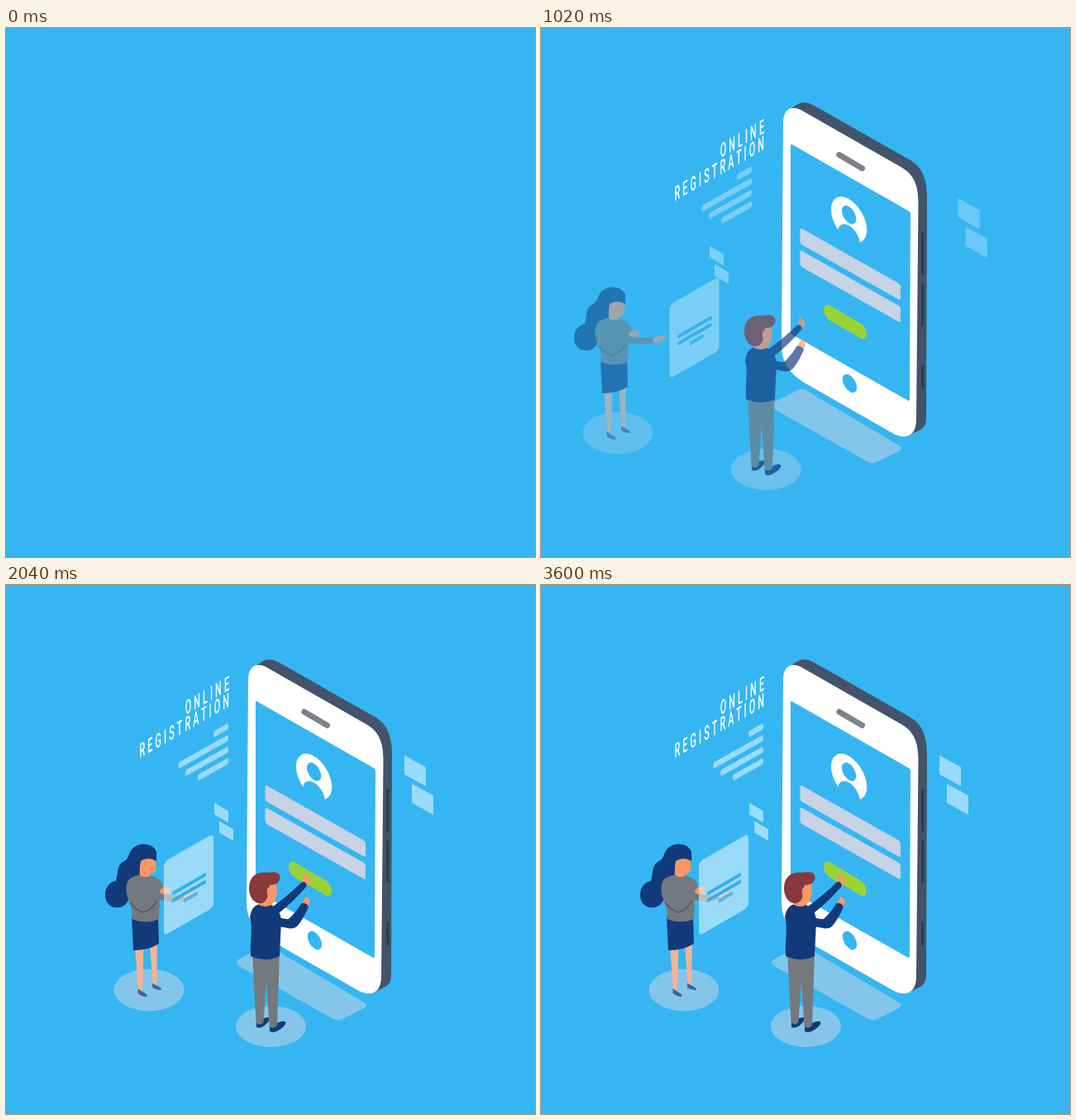
Write an HTML page that moves like this. It is 640 px wide and 640 px high and loops after 3.63 s.

```html
<!DOCTYPE html>
<html lang="en">
<head>
<meta charset="utf-8">
<title>Online registration</title>
<style>
  html, body { margin: 0; width: 100%; height: 100%; overflow: hidden; background: #35b6f2; }
  svg { display: block; width: 100vw; height: 100vh; }

  /* Every part slides in from --d with a quadratic ease-out while it fades in linearly. */
  .part {
    animation: var(--move) 3630ms cubic-bezier(.333, .667, .667, 1) infinite,
               var(--fade) 3630ms linear infinite;
  }
  .phone  { --move: drop;  --fade: fade-first; --d: 0 -150px; }
  .shadow { --move: drop;  --fade: fade-first; --d: 0 225px; }
  .lines  { --move: glide; --fade: fade-mid;   --d: -448px 0; }
  .man    { --move: walk;  --fade: fade-mid;   --d: -460px 0; }
  .panel  { --move: carry; --fade: fade-mid;   --d: -433px 0; }
  .woman  { --move: enter; --fade: fade-last;  --d: -362px 0; }
  .tiles  { --move: dock;  --fade: fade-last;  --d: 233px 0; }

  @keyframes drop  { 0%, 11.57% { translate: var(--d); } 28.1%, to  { translate: 0 0; } }
  @keyframes glide { 0%, 13.77% { translate: var(--d); } 31.18%, to { translate: 0 0; } }
  @keyframes walk  { 0%, 15.15% { translate: var(--d); } 34.33%, to { translate: 0 0; } }
  @keyframes carry { 0%, 15.15% { translate: var(--d); } 33.33%, to { translate: 0 0; } }
  @keyframes enter { 0%, 21.49% { translate: var(--d); } 34.02%, to { translate: 0 0; } }
  @keyframes dock  { 0%, 21.49% { translate: var(--d); } 31.13%, to { translate: 0 0; } }

  @keyframes fade-first { 0%, 11.57% { opacity: 0; } 24.24%, to { opacity: 1; } }
  @keyframes fade-mid   { 0%, 15.15% { opacity: 0; } 34%, to    { opacity: 1; } }
  @keyframes fade-last  { 0%, 21.49% { opacity: 0; } 34%, to    { opacity: 1; } }

  /* Ripple arcs: radius --r, start angle --a, sweep --s. */
  .ring { fill: none; animation: ripple 3630ms linear infinite; }
  @keyframes ripple {
    0%, 39.67% {
      r: calc(var(--r) * .6); stroke-dasharray: 0 400; opacity: 0;
      transform: rotate(calc(var(--a) - 50deg));
    }
    41% { opacity: 1; }
    42.98% {
      r: var(--r); stroke-dasharray: var(--s) 400;
      transform: rotate(var(--a));
    }
    50% { opacity: 1; }
    53.7%, to {
      r: calc(var(--r) * 1.2); stroke-dasharray: 0 400; opacity: 0;
      transform: rotate(calc(var(--a) + 110deg));
    }
  }

  .title { font: 500 24px Roboto, "Liberation Sans", sans-serif; letter-spacing: 6.9px; text-anchor: end; fill: #fff; }
  .glass { fill: #fff; fill-opacity: .5; }
  .blue  { fill: #35b6f2; }
  .navy  { fill: #123a7b; }
  .skin  { fill: #fb9766; }
  .grey  { fill: #73797f; }
  .floor { fill: #84c6ea; }
  .lime  { stroke: #9bd336; }
  .white { stroke: #fff; }
</style>
</head>
<body>
<svg viewBox="0 0 640 640">

  <path class="part shadow floor" d="M283 452L310 438.500Q316 435.500 322 439L433 505Q439 509 432 512.500L407 525Q401 528 395 524.500L282 461Q276 457 283 452Z"/>

  <g class="part phone">
    <path fill="#43536a" d="M300 99L311 92Q319 87.500 329 93L446 159.500C461 168 467 182 467 206L466 472Q466 482 459 486L443 494Z"/>
    <path fill="none" stroke="#2d3b4d" stroke-width="3" stroke-linecap="round" d="M461.700 248V297M461.700 310V359M461.700 409V435"/>
    <path fill="#fff" d="M293 115C293 99 302 92 316 100L436 168.500C451 177 456.500 190 456.500 212L454 474C454 492 443 500 425 490L322 431C301 419 291 405 291 384Z"/>
    <path class="blue" d="M302 142Q302 140 304 141L445 221.500Q447 223 447 225L446 449Q446 452 443.500 450.500L304 371Q302 370 302 367Z"/>
    <path fill="none" stroke="#7f8288" stroke-width="7" stroke-linecap="round" d="M360.800 153.500L388.500 169.800"/>
    <g transform="matrix(.866 .5 0 1 372.600 232)">
      <circle r="25" fill="#fff"/>
      <circle class="blue" cy="-6" r="10"/>
      <circle class="blue" cy="22.500" r="15.500"/>
      <circle class="blue" cx="1" cy="197.500" r="10"/>
    </g>
    <g transform="matrix(1 .566 0 1 313.500 241.500)" fill="#c8d3e5">
      <rect width="121.500" height="19.500" rx="3"/>
      <rect y="27" width="121.500" height="19.500" rx="3"/>
    </g>
    <rect transform="matrix(1 .577 0 1 342 331.500)" width="52" height="18" rx="8" fill="#9bd336"/>
    <g class="title">
      <text transform="matrix(.45 -.26 0 1 273.100 125)">ONLINE</text>
      <text transform="matrix(.45 -.26 0 1 273.100 145)">REGISTRATION</text>
    </g>
  </g>

  <g class="part lines">
    <g class="glass" transform="matrix(1 -.56 0 1 269 0)">
      <rect x="-18" y="167" width="18" height="7.500" rx="2.500"/>
      <rect x="-60.500" y="181" width="60.500" height="7.500" rx="2.500"/>
      <rect x="-52" y="195" width="52" height="7.500" rx="2.500"/>
      <rect x="-37" y="209" width="37" height="7.500" rx="2.500"/>
    </g>
  </g>

  <g class="part tiles glass">
    <path d="M482 206L508 220.500V243.500L482 229Z"/>
    <path d="M491 240.500L517 254.500V278L491 263.500Z"/>
  </g>

  <g class="part man glass">
    <path d="M252 263.500L269 273.500V287.500L252 277.500Z"/>
    <path d="M258 285.500L275 295.500V309.500L258 299.500Z"/>
  </g>

  <g class="part woman">
    <ellipse class="floor" cx="173" cy="490" rx="42.500" ry="25.500"/>
    <path fill="#f6b295" d="M156 438H166.500L165 490H160ZM174 434H183L182 484H177.500Z"/>
    <path fill="#4560a0" d="M159.500 488Q163 491 167 493Q172 496 170 498Q165 498.500 159.500 494ZM177 481.500Q181 484 185 486Q189 488 187.500 490Q182 490.500 177 487Z"/>
    <path class="navy" d="M152 401L184 400L185 434Q172 442 154 442Z"/>
    <path class="navy" d="M153 319C160 311 178 311 182 323V334L163 347L157 361C152 366 152 379 144 387C135 394 120 390 120 375C120 365 126 359 133 358C136 346 134 338 143 334C149 331 148 324 153 319Z"/>
    <path class="grey" d="M182 372Q190 376 217 374.500L218 380.500Q197 385 184 380Z"/>
    <path class="skin" d="M215 375L222 373Q227 371 232 371L231 374L226 379Q221 381.500 216 380.500Z"/>
    <path class="grey" d="M150 355Q162 348 176 352Q189 355 190 366L186 380L185 404Q170 411 152 404Q154 393 149 383Q143 368 147 359Z"/>
    <path fill="none" stroke="#555d66" stroke-width="2" d="M150 384Q158 394 166 396Q175 394 183 382"/>
    <path class="skin" d="M186 370Q189 365 193 365.500L200 367.500L197 370L199 373Q192 374 187 373Z"/>
    <path class="skin" d="M161 331Q171 326 181.500 333L181 345Q178 350 174 349V352Q168 355 162 351Z"/>
    <path class="navy" d="M158 333Q160 320 172 319Q183 322 182 334Q172 328 163 334L161 347L156 349Z"/>
  </g>

  <g class="part panel">
    <g transform="matrix(1 -.577 0 1 251 0)">
      <rect class="glass" x="-60" y="300.500" width="60" height="89.500" rx="5"/>
      <g fill="#35aee8">
        <rect x="-50" y="342.500" width="41" height="4.500" rx="1"/>
        <rect x="-50" y="351" width="41" height="4.500" rx="1"/>
        <rect x="-36" y="380" width="17" height="5" rx="1.500" transform="translate(0 -21)" fill-opacity=".8"/>
      </g>
    </g>
  </g>

  <g transform="matrix(.866 .5 0 1 364 355)">
    <circle class="ring lime" pathLength="360" stroke-width="2.800" style="--r:27px; --a:-90deg; --s:360"/>
    <circle class="ring lime" pathLength="360" stroke-width="1.600" style="--r:60px; --a:206deg; --s:121"/>
    <circle class="ring white" pathLength="360" stroke-width="2.200" style="--r:57px; --a:0deg; --s:90"/>
    <g transform="translate(-3 -14)">
      <circle class="ring lime" pathLength="360" stroke-width="1.600" style="--r:128px; --a:-47deg; --s:80"/>
    </g>
    <g transform="translate(12 16)">
      <circle class="ring white" pathLength="360" stroke-width="1.200" style="--r:143px; --a:128.700deg; --s:43"/>
    </g>
  </g>

  <g class="part man">
    <ellipse class="floor" cx="320.500" cy="534" rx="42.500" ry="25"/>
    <path class="navy" d="M303 529L312 524L318 523Q320 526 315 531Q309 537 303 535ZM319 534L330 529Q338 526 338.500 530Q337 534 331 538Q324 543 319 540Z"/>
    <path class="grey" d="M298 445H331L328 533Q323 538 318.500 534L315 478L311.500 529Q307 534 302.500 529Z"/>
    <path class="skin" d="M359 357L361 350Q363 347 364.500 352L368 356Q368 361 364 364ZM358 386L361 379Q364 375 365.500 379L368 382Q368 387 364 390Z"/>
    <path class="navy" d="M320 391Q341 376 358 359.500Q363 358 364 364Q350 381 330 397ZM322 399Q335 405 342 404Q351 396 357.500 385Q363 384 366 389Q361 402 353 412Q348 417 341 415L324 412Z"/>
    <path class="skin" d="M307 380L318 362H327L328 372L325 383Q321 386 320 389Q312 392 305 388Z"/>
    <path class="navy" d="M295 402Q297 389 305 386.500Q313 391 321 387Q333 394 333 407L331 449Q315 457 296 449C295 430 299 416 295 402Z"/>
    <path fill="#87393c" d="M294 367C294 353 303 346 317 348C325 346 332 348 331.500 354C331 361 325 363 319 363L317 374C316 384 308 388 301 383C296 379 294 373 294 367Z"/>
    <ellipse class="skin" cx="318.500" cy="371" rx="2.800" ry="5"/>
  </g>

</svg>
</body>
</html>
```
